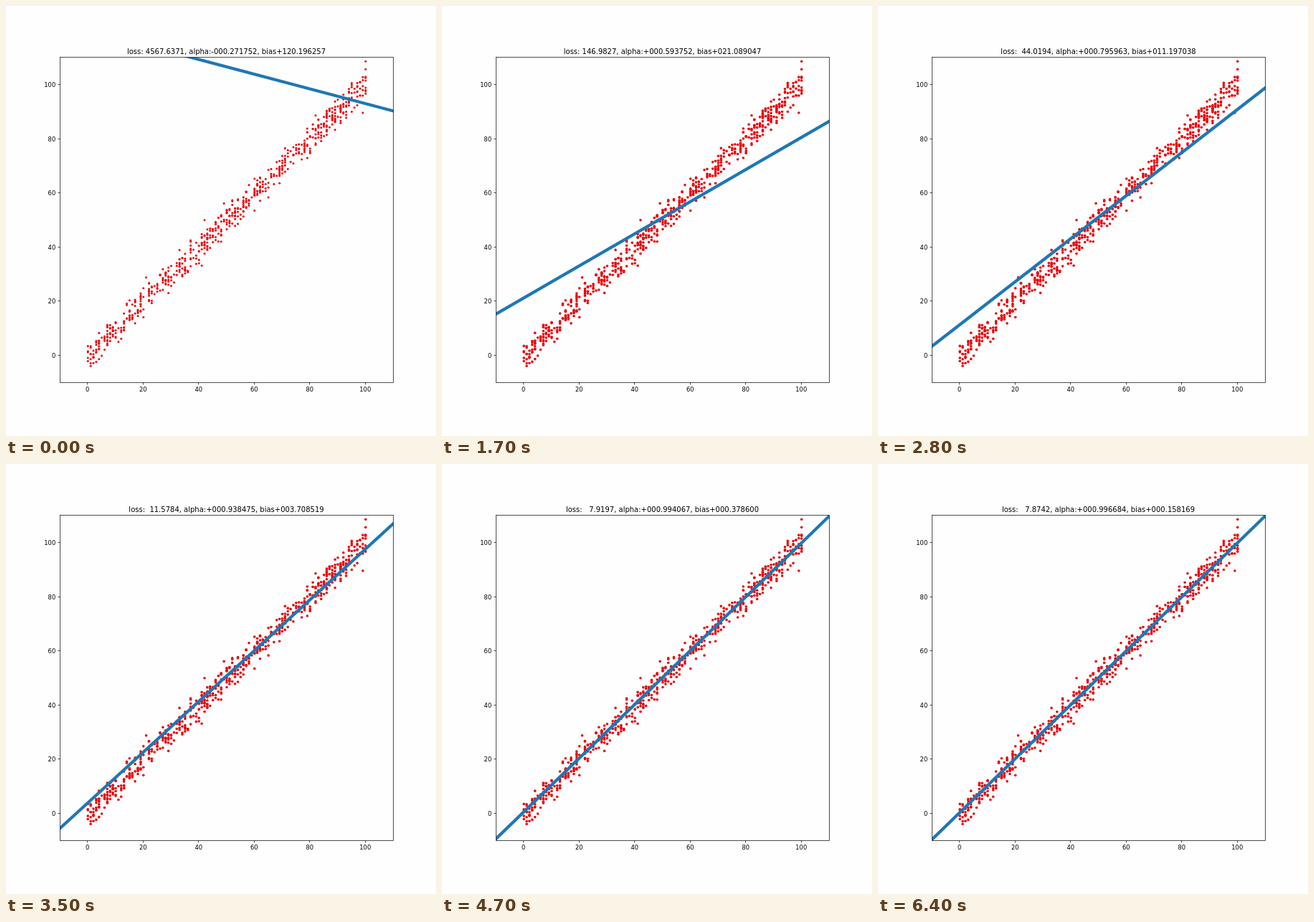
An HTML page with a canvas for the animation above (6.5 s loop, 600 by 600 pixels).

```html
<!DOCTYPE html>
<html lang="en">
<head>
<meta charset="utf-8">
<title>Linear regression fit</title>
<style>
  html, body { margin: 0; width: 100%; height: 100%; overflow: hidden; background: #fefefe; }
  canvas { display: block; width: 600px; height: 600px; }
</style>
</head>
<body>
<canvas id="stage" width="600" height="600"></canvas>
<script>
const ctx = document.getElementById('stage').getContext('2d');
const LOOP = 6500, STEP = 100;
const FONT = '"DejaVu Sans", sans-serif';
const box = { left: 75.5, top: 71.5, right: 540.5, bottom: 525.5 };
const px = x => 113.75 + x * 3.875;
const py = y => 487.25 - y * 3.775;

// Training milestones: time, alpha, bias, loss
const path = [
  [0, -0.271752, 120.196257, 4567.6371],
  [600, 0.481852, 20.198157, 264.6540],
  [1700, 0.593752, 21.089047, 146.9827],
  [2800, 0.795963, 11.197038, 44.0194],
  [4100, 0.983494, 1.078039, 8.2095],
  [5300, 0.996386, 0.189026, 7.8786],
  [5600, 0.996684, 0.158169, 7.8742]
];
const limits = [0.9968, 0.1456, 7.8724];

// Monotone cubic through [time, value] pairs
function curve(keys) {
  const last = keys.length - 1;
  const sec = keys.slice(1).map((k, i) => (k[1] - keys[i][1]) / (k[0] - keys[i][0]));
  const slope = keys.map((k, i) => {
    const a = sec[Math.max(i - 1, 0)], b = sec[Math.min(i, last - 1)];
    return a * b <= 0 ? 0 : 2 * a * b / (a + b);
  });
  return t => {
    if (t >= keys[last][0]) return keys[last][1];
    const i = keys.findIndex(k => k[0] > t) - 1;
    const [t0, v0] = keys[i], [t1, v1] = keys[i + 1];
    const h = t1 - t0, u = (t - t0) / h, w = 1 - u;
    return w * w * (1 + 2 * u) * v0 + u * w * w * h * slope[i]
         + u * u * (3 - 2 * u) * v1 - u * u * w * h * slope[i + 1];
  };
}

// Each value decays exponentially toward its limit, at a varying rate
const [alphaAt, biasAt, lossAt] = limits.map((limit, i) => {
  const sign = Math.sign(path[0][i + 1] - limit);
  const logGap = curve(path.map(k => [k[0], Math.log(Math.abs(k[i + 1] - limit))]));
  return t => limit + sign * Math.exp(logGap(t));
});

let seed = 20417;
function rand() {
  seed = (seed * 1664525 + 1013904223) % 4294967296;
  return seed / 4294967296;
}
function noise() {
  const v = 2.75 * Math.sqrt(-2 * Math.log(1 - rand())) * Math.cos(2 * Math.PI * rand());
  return Math.abs(v) < 6 ? v : noise();
}

// A few clear outliers, then a noisy band along y = x
const points = [[100, 108.7], [99, 89.7], [95, 100.7], [82, 88.7], [65, 58.4],
  [60, 53.5], [49, 56.2], [42, 50], [41, 33.2], [21, 28.8]];
for (let i = 0; i < 640; i++) {
  const x = Math.floor(rand() * 101);
  points.push([x, Math.max(x + noise(), -3.9)]);
}

function label(text, x, y, size, align) {
  ctx.font = size + 'px ' + FONT;
  ctx.textAlign = align;
  ctx.fillText(text, x, Math.round(y));
}

function segment(x0, y0, x1, y1) {
  ctx.beginPath();
  ctx.moveTo(x0, y0);
  ctx.lineTo(x1, y1);
  ctx.stroke();
}

function drawAxes() {
  ctx.strokeStyle = ctx.fillStyle = '#000';
  ctx.lineWidth = 0.7;
  ctx.strokeRect(box.left, box.top, box.right - box.left, box.bottom - box.top);
  for (let v = 0; v <= 100; v += 20) {
    const x = Math.floor(px(v)) + 0.5, y = Math.floor(py(v)) + 0.5;
    segment(x, box.bottom, x, box.bottom + 3);
    segment(box.left - 3, y, box.left, y);
    label(v, px(v), 538, 8.33, 'center');
    label(v, 69.2, py(v) + 3.4, 8.33, 'right');
  }
}

function drawPoints(radius) {
  ctx.fillStyle = '#e80308';
  for (const [x, y] of points) {
    ctx.beginPath();
    ctx.arc(px(x) + 0.5, py(y) + 0.3, radius, 0, 2 * Math.PI);
    ctx.fill();
  }
}

function drawFit(alpha, bias) {
  ctx.save();
  ctx.beginPath();
  ctx.rect(box.left, box.top, box.right - box.left, box.bottom - box.top);
  ctx.clip();
  ctx.strokeStyle = '#1f77b4';
  ctx.lineWidth = 4.3;
  segment(px(-20), py(bias - 20 * alpha), px(120), py(bias + 120 * alpha));
  ctx.restore();
}

const signed = v => (v < 0 ? '-' : '+') + Math.abs(v).toFixed(6).padStart(10, '0');

function draw() {
  const t = Math.floor(performance.now() % LOOP / STEP) * STEP;
  const alpha = alphaAt(t), bias = biasAt(t);
  const loss = lossAt(t).toFixed(4).padStart(8);
  ctx.fillStyle = '#fefefe';
  ctx.fillRect(0, 0, 600, 600);
  drawPoints(1.5 + 0.3 * Math.min(t / 1700, 1));
  drawFit(alpha, bias);
  drawAxes();
  label(`loss: ${loss}, alpha:${signed(alpha)}, bias${signed(bias)}`, 307.5, 67, 10, 'center');
  requestAnimationFrame(draw);
}
draw();
</script>
</body>
</html>
```
